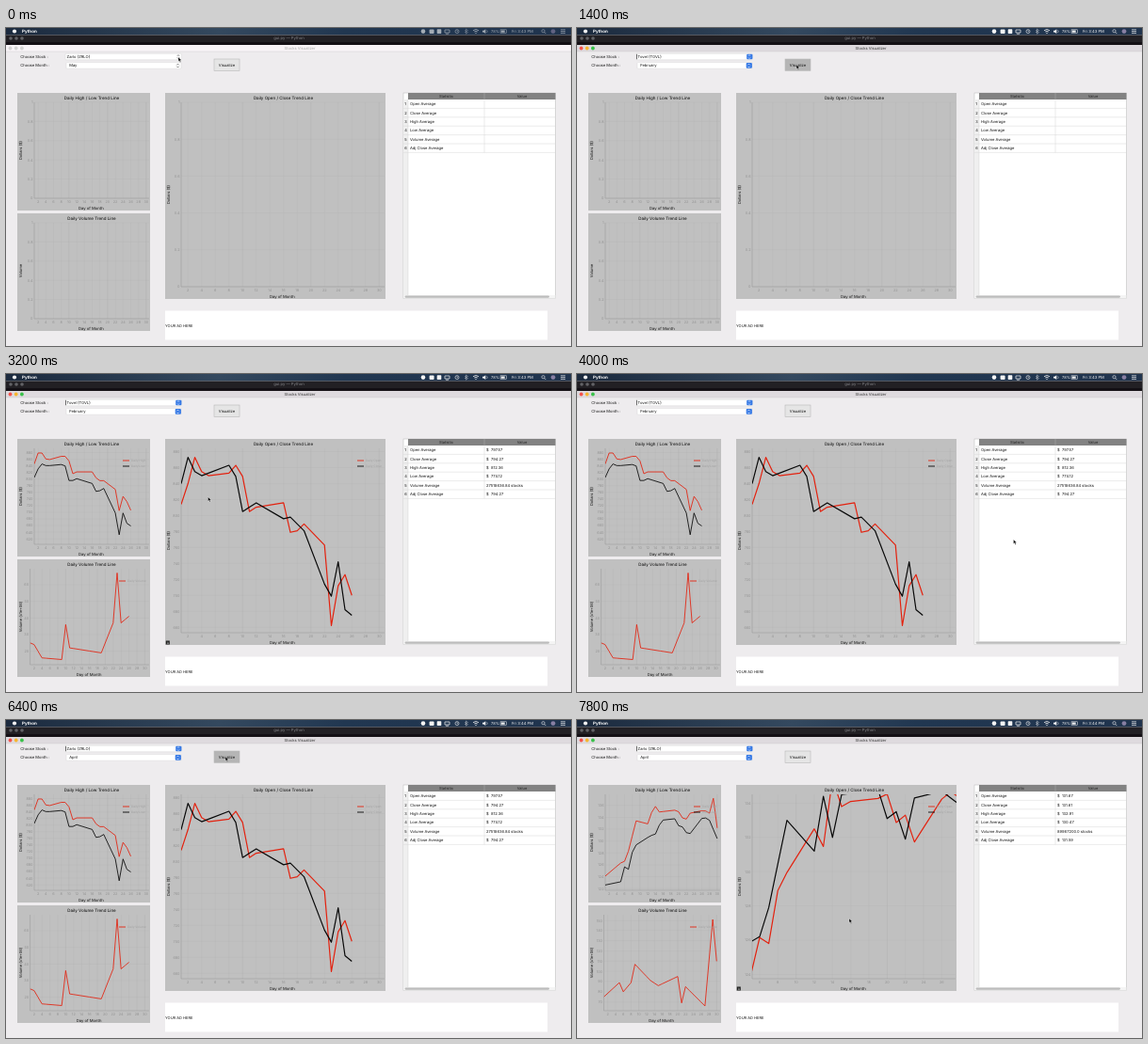
Write an HTML page that moves like this. It is 600 px wide and 338 px high and loops after 8000 ms.

```html
<!DOCTYPE html>
<html lang="en">
<head>
<meta charset="utf-8">
<title>Stocks Visualizer</title>
<style>
  html, body { margin: 0; width: 100%; height: 100%; overflow: hidden; background: #eeecee; }
  svg { display: block; }
  #stage { width: 100vw; height: 100vh; }
  text { font-family: Inter, "Open Sans", sans-serif; white-space: pre; text-rendering: geometricPrecision; }
</style>
</head>
<body>
<svg id="stage" viewBox="0 0 600 338"></svg>
<script>
const LOOP = 8000, STEP = 200;
const RED = '#e3220f', BLACK = '#080808';
const stage = document.getElementById('stage');

const lerp = (a, b, k) => a + (b - a) * k;
const clamp = v => Math.max(0, Math.min(1, v));

// Straight-line interpolation through [position, value] pairs.
function sample(keys, at) {
  const i = keys.findIndex(k => k[0] >= at);
  if (i < 0) return keys[keys.length - 1][1];
  if (i === 0) return keys[0][1];
  const [a, va] = keys[i - 1], [b, vb] = keys[i];
  return lerp(va, vb, (at - a) / (b - a));
}

// Each day opens at the previous close plus the overnight gap;
// highs and lows lie a fixed spread outside open and close.
function market({ last, firstWeekday, holiday, close, gap, volume, above, below, stats }) {
  const m = { days: [], open: [], close: [], high: [], low: [], volume: [], stats };
  let previous = close[0][1];
  for (let d = 1; d <= last; d++) {
    if ((d - 1 + firstWeekday) % 7 > 4 || d === holiday) continue;
    const jump = sample(gap, d), o = previous + jump, c = sample(close, d);
    m.days.push(d);
    m.open.push(o);
    m.close.push(c);
    m.high.push(Math.max(o, c) + above);
    m.low.push(Math.min(o, c) - below - Math.abs(jump) * .4);
    m.volume.push(sample(volume, d));
    previous = c;
  }
  return m;
}

const february = market({
  last: 26, firstWeekday: 0, holiday: 15, above: 6, below: 9,
  close: [[0, 814], [1, 840], [2, 873], [3, 855], [4, 850], [8, 863], [9, 849], [10, 805], [12, 816],
    [16, 796], [17, 798], [19, 781], [22, 714], [23, 699], [24, 742], [25, 682], [26, 675]],
  gap: [[16, 0], [17, -17], [18, -17], [19, 0], [22, -18], [23, -52], [24, 13], [25, -16], [26, 18]],
  volume: [[1, 25], [2, 24], [4, 16], [9, 15], [10, 36], [11, 22], [19, 19], [22, 37], [23, 67], [24, 37], [26, 41]],
  stats: ['$  797.57', '$  794.27', '$  812.36', '$  774.12', '27518636.84 stocks', '$  794.27']
});
const april = market({
  last: 30, firstWeekday: 3, holiday: 2, above: .4, below: .4,
  close: [[0, 123.7], [1, 123], [5, 125.9], [6, 126.2], [7, 127.9], [9, 133], [12, 131.2], [13, 134.4], [14, 132],
    [15, 134.5], [19, 134.8], [20, 133.1], [21, 133.5], [22, 131.9], [23, 134.3], [26, 134.7], [29, 133.5], [30, 131.5]],
  gap: [[1, 0], [5, .9], [7, -.4], [8, 1], [9, -.5], [12, -.5], [15, 1.8], [16, -.4], [28, 0], [29, 2.9], [30, -1.7]],
  volume: [[1, 75], [5, 89], [6, 80], [8, 89], [9, 107], [13, 91], [15, 86], [20, 95], [21, 69], [22, 85], [27, 66], [29, 151], [30, 110]],
  stats: ['$  131.67', '$  131.61', '$  132.91', '$  130.47', '89987200.0 stocks', '$  131.59']
});
const statNames = ['Open', 'Close', 'High', 'Low', 'Volume', 'Adj Close'];

const pointerX = [[0, 183], [600, 180], [1000, 172], [1400, 233], [2200, 88], [2800, 90], [4000, 463.5],
  [5600, 215], [5800, 183], [6200, 183], [6400, 233], [7800, 289]];
const pointerY = [[0, 31], [600, 43], [1000, 30], [1400, 39], [2200, 74], [4000, 176], [5600, 0],
  [5800, 30], [6400, 39], [7800, 211]];

const rect = (x, y, w, h, fill, extra = '') =>
  `<rect x="${x}" y="${y}" width="${w}" height="${h}" fill="${fill}" ${extra}/>`;
const circle = (x, y, r, fill, extra = '') =>
  `<circle cx="${x}" cy="${y}" r="${r}" fill="${fill}" ${extra}/>`;
const path = (d, stroke, width = .5, extra = '') =>
  `<path d="${d}" fill="none" stroke="${stroke}" stroke-width="${width}" ${extra}/>`;
const text = (x, y, s, size = 4.1, fill = '#111', anchor = 'start', extra = '') =>
  `<text x="${x}" y="${y}" font-size="${size}" fill="${fill}" text-anchor="${anchor}" ${extra}>${s}</text>`;
const middle = (x, y, s, size, fill, extra) => text(x, y, s, size, fill, 'middle', extra);

// view: x of day 1, px per day, a value with its y, px per unit, tick spacing
function plot(p, view, data, hover) {
  const { x, y, w, h, bottom } = p;
  const [left, perDay, value, atY, perUnit, tick] = view;
  const axis = p.axis ?? left, top = y + 10, right = x + w - 1;
  const px = d => left + (d - 1) * perDay;
  const py = v => atY - (v - value) * perUnit;
  let out = rect(x, y, w, h, '#c0c0c0') + middle(x + w / 2 + 8.5, y + 6.7, p.title, 4.5, '#000');

  for (let d = 2; d <= 30; d += 2) {
    const gx = px(d);
    if (gx < axis || gx > right) continue;
    out += path(`M${gx} ${top}V${bottom}`, '#999', .4, `opacity="${d % 10 ? .22 : .5}"`)
         + middle(gx, bottom + 5, d, 3.8, '#929292');
  }
  const lowest = Math.ceil((value + (atY - bottom) / perUnit) / tick - .01);
  for (let n = lowest; py(n * tick) >= top - .5; n++) {
    const gy = py(n * tick);
    out += path(`M${axis} ${gy}H${right}`, '#999', .4, 'opacity=".28"')
         + text(axis - 1.5, gy + 1.4, +(n * tick).toFixed(1), 3.8, '#929292', 'end');
  }
  out += path(`M${axis} ${top}V${bottom}H${right}`, '#969696');

  if (data) {
    const width = right + 1 - axis, height = bottom - top;
    const curves = p.series.map(([key, color]) => {
      const points = data[key].map((v, i) => `${px(data.days[i])} ${py(v)}`);
      return path('M' + points.join('L'), color, p.line, 'stroke-linejoin="round"');
    }).join('');
    out += `<svg x="${axis}" y="${top}" width="${width}" height="${height}"
      viewBox="${axis} ${top} ${width} ${height}">${curves}</svg>`;
    p.series.forEach(([, color, name], i) => {
      const [lx, ly] = p.legend;
      out += path(`M${lx} ${ly + i * 6}h7`, color, .9)
           + text(lx + 9, ly + i * 6 + 1.2, name, 3.2, '#a2a2a2');
    });
  }
  const unit = data && p.unit || '', cy = (top + bottom) / 2;
  out += middle(x + 4.6, cy, p.label + unit, 4.1, '#111', `transform="rotate(-90 ${x + 4.6} ${cy})"`)
       + middle((axis + right) / 2 - .7, bottom + 12, 'Day of Month', 4.2);
  if (hover) out += rect(x + .8, y + h - 4.5, 4, 4, '#222')
    + middle(x + 2.8, y + h - 1.2, 'A', 3.2, '#eee');
  return out;
}

const plots = [
  { x: 12, y: 69, w: 141, h: 125, bottom: 181, title: 'Daily High / Low Trend Line', label: 'Dollars ($)',
    line: .85, legend: [124, 92], series: [['high', RED, 'Daily High'], ['low', BLACK, 'Daily Low']] },
  { x: 12, y: 197, w: 141, h: 125, bottom: 309, title: 'Daily Volume Trend Line', label: 'Volume', unit: ' (x1e+06)',
    line: .85, legend: [120, 220], series: [['volume', RED, 'Daily Volume']] },
  { x: 169, y: 69, w: 234, h: 219, bottom: 275, title: 'Daily Open / Close Trend Line', label: 'Dollars ($)',
    line: 1.2, axis: 186, legend: [373, 92], series: [['open', RED, 'Daily Open'], ['close', BLACK, 'Daily Close']] }
];

function viewsAt(t) {
  if (t < 1600) return [[30, 4.1, 0, 181, 102, .2], [30, 4.1, 0, 309, 102, .2], [186, 7.25, 0, 275, 196, .2]];
  if (t < 6600) return [[30, 4.1, 619, 175.5, .352, 20], [25.6, 4.2, 15, 303.5, 1.77, 10], [186, 7.25, 662, 267.5, .848, 20]];
  const zoom = clamp((t - 7200) / 600);
  const whole = [186, 7.25, 132.4, 140.5, 13.44, 2], near = [145.6, 9.67, 132.4, 117.5, 18.2, 2];
  return [[30, 4.1, 122.5, 176, 6.31, 2], [28.5, 4.13, 66, 304, 1.082, 10], whole.map((v, i) => lerp(v, near[i], zoom))];
}

function menuBar(t) {
  const white = '#f4f4f4';
  const icons = circle(443, 3.6, 2.3, white) + rect(449.6, 1.5, 5, 4.5, white, 'rx="1"')
    + rect(457.7, 1.3, 4.6, 4.6, white, 'rx=".6"')
    + path('M466 5V2H471V5ZM467 6.2H470', white, .7)
    + circle(479, 3.6, 2, 'none', `stroke="${white}" stroke-width=".6"`) + path('M479 2.3V3.7H480', white)
    + path('M488.5 1V6.2L490.5 4.7L487 2.3M487 4.9L490.5 2.5L488.5 1', '#c6cbd1')
    + path('M496 2.7Q499 .2 502 2.7M497.3 4Q499 2.5 500.7 4', white, .8) + circle(499, 5.4, .6, white)
    + `<path d="M506 2.7h1.3l2-1.4v4.6l-2-1.4H506Z" fill="${white}"/>` + path('M510.5 2.2Q512 3.6 510.5 5', white)
    + text(515, 5.1, '78%', 4, white)
    + rect(525, 1.8, 6.4, 3.6, 'none', `stroke="${white}" stroke-width=".5"`) + rect(525.7, 2.5, 4, 2.2, white)
    + text(537, 5.1, `Fri 3:4${t < 5000 ? 3 : 4} PM`, 4.2, white)
    + circle(570.5, 3.2, 1.6, 'none', `stroke="${white}" stroke-width=".6"`) + path('M571.7 4.4L573.3 6', white, .7)
    + circle(581, 3.6, 2.4, '#887fa3')
    + path('M589 1.8H594M589 3.6H594M589 5.4H594', white, .7);
  return `<linearGradient id="sky"><stop stop-color="#1b2a3e"/><stop offset=".38" stop-color="#34495f"/>
      <stop offset=".6" stop-color="#213751"/><stop offset="1" stop-color="#20344e"/></linearGradient>`
    + rect(0, 0, 600, 7.5, 'url(#sky)') + circle(9, 3.5, 2.1, white)
    + text(17, 5.2, 'Python', 4.5, '#fff', 'start', 'font-weight="700"')
    + `<g opacity="${t ? 1 : .62}">${icons}</g>`
    + rect(0, 7.5, 600, 10.5, '#222024') + rect(0, 15, 600, 3, '#141015')
    + [5, 11, 17].map(x => circle(x, 11, 1.8, '#626266')).join('')
    + middle(300.5, 12.4, 'gui.py — Python', 4.2, '#858589');
}

function combo(x, y, w, label, value, indent, active) {
  const ink = active ? '#fff' : '#444', bx = x + w - 3.5, my = y + 3.4;
  return text(15.3, y + 4.8, label) + rect(x, y, w, 6.6, '#fff', 'stroke="#d0d0d0" stroke-width=".4" rx=".8"')
    + (active ? rect(bx - 2.8, y + .5, 6.2, 5.6, '#3478e5', 'rx="1"') : '')
    + path(`M${bx - 1.2} ${my - .7}l1.2 -1.3l1.2 1.3M${bx - 1.2} ${my + .7}l1.2 1.3l1.2 -1.3`, ink, .6)
    + text(x + indent, y + 4.8, value);
}

function table(stats) {
  let out = rect(422, 69, 161.5, 218.5, '#fff', 'stroke="#b6b6b6" stroke-width=".5"')
    + rect(422, 76, 5, 211, '#efefef') + rect(427, 69, 156.5, 7, '#828282')
    + path('M508 69V76', '#aaa') + middle(467.5, 73.7, 'Statistic', 4, '#222') + middle(548, 73.7, 'Value', 4, '#222');
  statNames.forEach((name, i) => {
    const y = 76 + i * 9.4;
    out += path(`M422 ${y + 9.4}H583.5`, '#d2d2d2', .45) + text(423.2, y + 6.1, i + 1, 4)
      + text(429, y + 6.1, name + ' Average') + (stats ? text(510, y + 6.1, stats[i]) : '');
  });
  return out + path('M427 76V287M508 76V132.4', '#d2d2d2', .45)
    + rect(422.3, 284, 161, 3.4, '#f4f4f4') + rect(423.5, 284.5, 153.5, 2.2, '#bcbcbc', 'rx="1.1"');
}

function draw(t) {
  const active = t > 0, pressed = t === 1400 || t === 6400;
  const data = t < 1600 ? null : t < 6600 ? february : april;
  const stock = t >= 400 && t < 6000 ? 'Tovel (TOVL)' : 'Zarlo (ZRLO)';
  const month = t < 1000 ? 'May' : t < 6200 ? 'February' : 'April';
  const mx = sample(pointerX, t), my = sample(pointerY, t);
  const lights = active ? ['#f4544d', '#f6b62f', '#38c149'] : Array(3).fill('#d4d4d4');
  const views = viewsAt(t);
  const hovered = p => data && mx > p.x && mx < p.x + p.w && my > p.y && my < p.y + p.h;

  stage.innerHTML = rect(0, 0, 600, 338, '#eeecee') + menuBar(t)
    + rect(0, 18, 600, 7, active ? '#dedade' : '#f8f4f7') + path('M0 25H600', '#c8c8c8', .4)
    + lights.map((c, i) => circle(4.5 + i * 6.2, 21.5, 1.9, c)).join('')
    + middle(312, 23.1, 'Stocks Visualizer', 4.1, active ? '#333' : '#aaa')
    + combo(63, 27.2, 123.5, 'Choose Stock :', stock, 1.6, active)
    + (active ? path('M63.5 27.8V33.2', '#111', .6) : '')
    + combo(64, 36.6, 122, 'Choose Month :', month, 3.2, active)
    + rect(221, 33, 27, 12.3, pressed ? '#b5b5b5' : '#e5e5e5', 'stroke="#b8b8b8" stroke-width=".6"')
    + middle(234.5, 40.6, 'Visualize')
    + plots.map((p, i) => plot(p, views[i], data, hovered(p))).join('')
    + table(data && data.stats)
    + rect(169, 300.5, 406, 31, '#fff') + text(169, 317.7, 'YOUR AD HERE', 4)
    + `<path transform="translate(${mx} ${my})" d="M0 0V4.6L1.1 3.6L1.9 5.4L2.7 5L2 3.3H3.4Z"
        fill="#000" stroke="#fff" stroke-width=".35"/>`;
}

let shown = -1;
function frame(now) {
  const t = Math.floor(now % LOOP / STEP) * STEP;
  if (t !== shown) draw(shown = t);
  requestAnimationFrame(frame);
}
draw(0);
requestAnimationFrame(frame);
</script>
</body>
</html>
```
